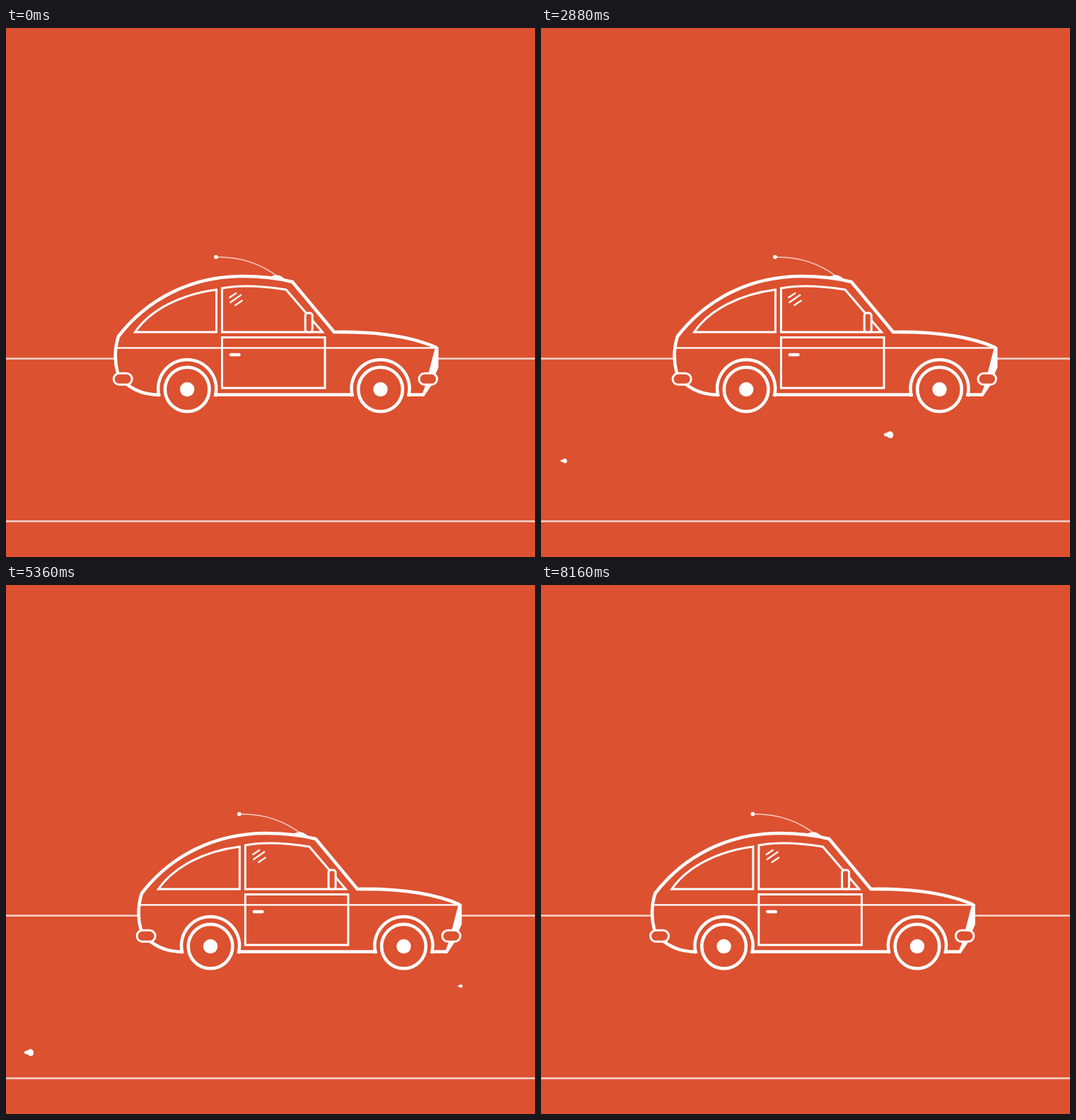
An HTML page that plays this animation: 748 px wide and 748 px high, repeating every 8240 ms.

```html
<!DOCTYPE html>
<html lang="en">
<head>
<meta charset="utf-8">
<title>Road trip</title>
<style>
  html, body { margin: 0; width: 100%; height: 100%; overflow: hidden; background: #dc5130; }
  svg { display: block; width: 100%; height: 100%; }
  .line { fill: none; stroke: #fff; stroke-width: 3; }
  .thick { stroke-width: 4.6; }
  .skin { fill: #dc5130; }
  .solid { fill: #fff; }
  .road { stroke: #fff; stroke-width: 2.4; opacity: .76; }
</style>
</head>
<body>
<svg viewBox="0 0 748 748">
  <defs>
    <g id="wheel">
      <path class="line thick" d="M-39.5 10 A41 41 0 1 1 39.5 10"/>
      <circle class="line thick skin" r="31.3"/>
      <circle class="solid" r="10.2"/>
    </g>
    <path id="pebble" class="solid" d="M-7 0 C-7 -3 -4 -2 -2 -3 C0 -6 6 -5 6 0 C7 6 0 6 -2 3 C-4 2 -7 3 -7 0 Z"/>
  </defs>
  <path class="road" d="M0 467.5 H748 M0 697.5 H748"/>
  <g id="post">
    <path class="line" d="M0 467 V312"/>
    <circle class="line skin" cy="298" r="13"/>
  </g>
  <g id="car">
    <path class="line" stroke-linecap="round" style="stroke-width:1.4;opacity:.72" d="M297 324 C330 323 360 333 385 352"/>
    <circle class="solid" cx="297" cy="323.8" r="2.9"/>
    <path class="solid" d="M372 353 Q385 344 396 357 Z"/>
    <path class="skin" d="M158 436 C200 383 262 351 335 351 C360 351 385 354 405 359 L464 430 C520 429 570 435 609 452 L590 518 H210 C185 517 166 503 158 488 C153 470 154 452 158 436 Z"/>
    <path class="line thick" d="M217 518.5 H210 C191 517 179 511 169 502 M158 488 C153 470 154 452 159 436 C200 383 262 351 335 351 C360 351 385 354 405 359 L464 430 C520 429 570 435 609 452 M296 518.5 H490 M569 518.5 H590"/>
    <path class="solid" d="M607 451 L611.5 451 V480 L607 490 H597 Z M594 503 H603 L591 521 H587 Z"/>
    <path class="line" style="stroke-width:2.2" d="M157 452.3 H609"/>
    <path class="line" d="M182.5 430 H297.5 V370 C250 376 205 397 182.5 430 Z"/>
    <path class="line" d="M305.5 430 V368 C330 363 365 365 396 370 L447.5 430 Z"/>
    <rect class="line" x="305.5" y="437.5" width="145.5" height="71.5"/>
    <path class="line" stroke-linecap="round" style="stroke-width:4.6" d="M318 462 H329.5"/>
    <path class="line" style="stroke-width:2.2" d="M315.5 381.5 L326 374.5 M316.5 388.5 L333 377 M323.5 392.5 L334.5 385"/>
    <rect class="line skin" x="423.2" y="403" width="10" height="27" rx="3.5"/>
    <rect class="line skin" x="152.2" y="488.3" width="26" height="16" rx="8"/>
    <rect class="line skin" x="584" y="488.3" width="25.5" height="16" rx="8"/>
    <use href="#wheel" x="256.2" y="511"/>
    <use href="#wheel" x="529.5" y="511"/>
  </g>
  <g id="pebbles"></g>
</svg>
<script>
  const LOOP = 8240, TICK = 80, HOP = 153;
  const PEAK = 4020, OUT = 0.0118, BACK = 0.01087;
  const SVG = 'http://www.w3.org/2000/svg';
  const car = document.getElementById('car');
  const post = document.getElementById('post');

  // Each lane: height, size, x shift, start times
  const lanes = [
    [612, .7, -.4, [480, 1600, 2560]],
    [575, 1, 0, [1760, 2800, 6960]],
    [658, .7, -.6, [2080, 7520]],
    [661, 1, 0, [3200, 4080, 5040, 6000]],
    [567, .5, -2.5, [4320, 5360, 6400]]
  ].map(([y, size, shift, starts]) => {
    const el = document.createElementNS(SVG, 'use');
    el.setAttribute('href', '#pebble');
    document.getElementById('pebbles').append(el);
    return { el, y, size, shift, starts };
  });

  const place = (el, x, y = 0, size = 1) =>
    el.setAttribute('transform', `translate(${x} ${y}) scale(${size})`);

  function draw(t) {
    place(car, t < PEAK ? t * OUT : PEAK * OUT - (t - PEAK) * BACK);
    place(post, 764 - (t - 3440) * 0.88);
    for (const { el, y, size, shift, starts } of lanes) {
      const start = starts.find(s => t >= s && t < s + 5 * TICK);
      const x = start === undefined ? -100 : 645 - (t - start) / TICK * HOP;
      place(el, x + shift, y, size);
    }
  }

  const begin = performance.now();
  function loop() {
    const t = (performance.now() - begin) % LOOP;
    draw(Math.floor(t / TICK) * TICK);
    requestAnimationFrame(loop);
  }
  loop();
</script>
</body>
</html>
```
